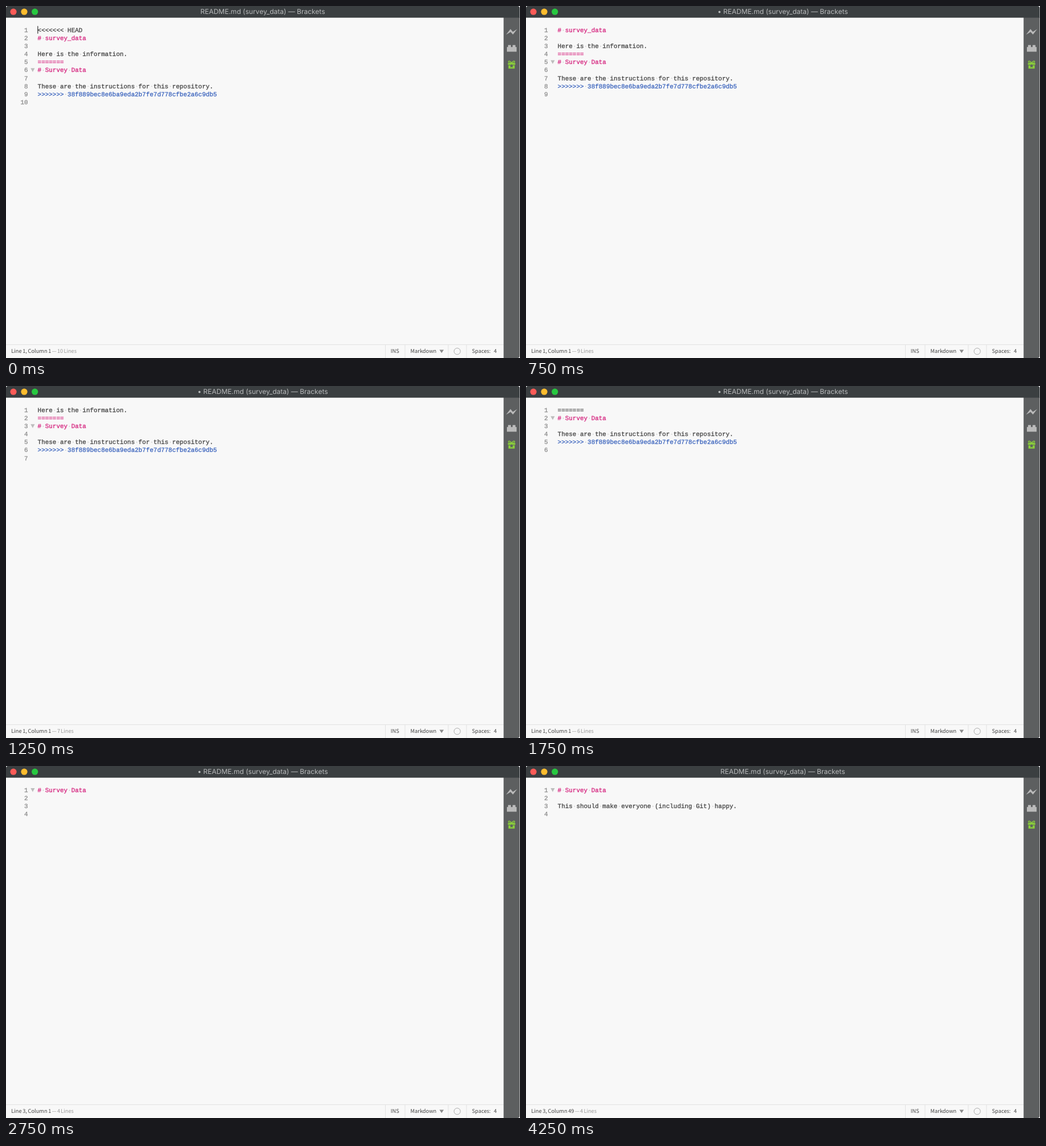
An HTML page that plays this animation: 903 by 620 pixels, repeating every 6750 ms.

```html
<!DOCTYPE html>
<html lang="en">
<head>
<meta charset="utf-8">
<title>Editor</title>
<style>
  html, body { margin: 0; width: 100%; height: 100%; overflow: hidden; background: #fff; }
  svg { display: block; width: 903px; height: 620px; }
  text { text-rendering: geometricPrecision; white-space: pre; }
  .title { font: 12px Inter, Roboto, sans-serif; fill: #b9bbbc; text-anchor: middle; }
  .code { font: 10.95px "Liberation Mono", "Noto Sans Mono", monospace;
          font-variant-ligatures: none; stroke-width: .3px; }
  .status { font: 9.25px "Noto Sans CJK JP", "Noto Sans CJK SC", "Noto Sans", sans-serif;
            fill: #454545; word-spacing: -.4px; }
  #count { font-weight: 300; fill: #999; word-spacing: -.9px; }
  .rule { stroke: #e2e2e2; fill: none; }
</style>
</head>
<body>
<svg viewBox="0 0 903 620" xmlns="http://www.w3.org/2000/svg">
  <defs>
    <clipPath id="window"><rect width="902.5" height="620" rx="4"/></clipPath>
  </defs>
  <g clip-path="url(#window)">
    <rect width="903" height="620" fill="#f8f8f8"/>
    <rect x="874.2" y="20" width="29" height="600" fill="#5d5f60"/>
    <rect width="903" height="20.6" fill="#3b3f41"/>
  </g>
  <circle cx="13" cy="10.2" r="5.6" fill="#fc5b57"/>
  <circle cx="32" cy="10.2" r="5.6" fill="#fdbc2e"/>
  <circle cx="50.7" cy="10.2" r="5.6" fill="#28c840"/>
  <text id="title" class="title" x="451" y="14.3"></text>

  <g fill="#bababa">
    <path d="M878.5 50.5 886.3 40.6 890.4 45.4 898 40.8 890.6 50.2 886.5 45.8Z"/>
    <path d="M880 72.3h2v-3.5h5v3.5h3v-3.5h5v3.5h2v8.2h-17z"/>
  </g>
  <g fill="#8bd13a">
    <path d="M888.2 100.4C881 100.4 882 96 884.8 97.2Q887 98.2 888.2 100.4Q889.4 98.2 891.6 97.2C894.4 96 895.4 100.4 888.2 100.4" fill="none" stroke="#8bd13a" stroke-width="1.3"/>
    <path d="M881.7 100.6h13v3h-13zM882.7 104.4h11v5.8h-11z"/>
    <path d="M888.2 102l1 2.2 2.300.3-1.700 1.600.5 2.300-2.100-1.100-2.100 1.100.5-2.300-1.700-1.600 2.300-.3z" fill="#5d5f60"/>
  </g>

  <g id="editor"></g>
  <rect id="caret" x="55.3" y="35.3" width="1.1" height="13.4" fill="#222"/>

  <path class="rule" d="M0 596.5H874M666.5 597V620M701 597V620M777 597V620M809 597V620"/>
  <text class="status" x="9.2" y="611.4"><tspan id="position"></tspan><tspan id="count"></tspan></text>
  <text class="status" x="675.8" y="611.4">INS</text>
  <text class="status" x="710.6" y="611.4">Markdown</text>
  <path d="M761.5 605.6h7.6l-3.8 5.6z" fill="#8a8a8a"/>
  <circle cx="792.7" cy="608.2" r="5.6" fill="none" stroke="#aaa"/>
  <text class="status" x="818.6" y="611.4">Spaces:</text>
  <text class="status" x="857" y="611.4">4</text>
</svg>
<script>
const STEP = 250, LOOP = 6750, LAST_STEP = 17;
const LEFT = 55.6, TOP = 45.9, ADVANCE = 6.57, LEADING = 14.1;
const DARK = '#454545', PINK = '#d5237e', BLUE = '#3a63bd';

const HEADING = '# Survey Data';
const HASH_LINE = '>>>>>>> 38f889bec8e6ba9eda2b7fe7d778cfbe2a6c9db5';
const CONFLICT = ['<<<<<<< HEAD', '# survey_data', '', 'Here is the information.', '=======',
  HEADING, '', 'These are the instructions for this repository.', HASH_LINE, ''];
const MESSAGE = 'This should make everyone (including Git) happy.';
const DELETED = [0, 0, 0, 1, 2, 3, 3, 4, 4, 5];   // lines removed from the top, per step
const TYPED = [0, 6, 13, 19, 26, 40, 48];         // characters typed, per step
const TYPING_START = 11;

const byId = id => document.getElementById(id);
const editor = byId('editor');

function add(name, attrs, content = '') {
  const node = document.createElementNS('http://www.w3.org/2000/svg', name);
  for (const key in attrs) node.setAttribute(key, attrs[key]);
  node.textContent = content;
  editor.appendChild(node);
}

const addCode = (x, y, content, color, anchor = 'start') =>
  add('text', { class: 'code', x, y, fill: color, stroke: color, 'text-anchor': anchor }, content);

function stateAt(step) {
  if (step < DELETED.length) {
    return { lines: CONFLICT.slice(DELETED[step]), row: 1, column: 1 };
  }
  if (step < TYPING_START) {
    return { lines: [HEADING, '', HASH_LINE, ''], row: 3, column: 1 };
  }
  const typed = TYPED[step - TYPING_START];
  return { lines: [HEADING, '', MESSAGE.slice(0, typed), ''], row: 3, column: typed + 1 };
}

function colorOf(line, previous) {
  if (line.startsWith('#')) return PINK;
  if (line.startsWith('>')) return BLUE;
  return line.startsWith('=') && previous ? PINK : DARK;
}

function drawLine(line, index, lines) {
  const y = TOP + index * LEADING;
  addCode(38.7, y, index + 1, '#8c8c8c', 'end');
  if (line === HEADING) add('path', { d: `M43.3 ${y - 6.8}h7.2l-3.6 6.6z`, fill: '#bdbdbd' });
  if (!line) return;
  addCode(LEFT, y, line, colorOf(line, lines[index - 1]));
  [...line].forEach((char, column) => {
    if (char !== ' ') return;
    const trailing = column === line.length - 1;
    add('circle', {
      cx: LEFT + (column + .5) * ADVANCE, cy: y - 3.2,
      r: trailing ? 1 : .75, fill: trailing ? '#d8304f' : '#b4b4b4'
    });
  });
}

function draw(step) {
  const { lines, row, column } = stateAt(step);
  const modified = step >= 3 && step < LAST_STEP;
  editor.replaceChildren();
  lines.forEach(drawLine);
  byId('title').textContent = (modified ? '• ' : '') + 'README.md (survey_data) — Brackets';
  byId('position').textContent = `Line ${row}, Column ${column}`;
  byId('count').textContent = ` — ${lines.length} Lines`;
  byId('caret').style.display = step === 0 ? '' : 'none';
}

let shown = -1;
const start = performance.now();
function tick() {
  const time = (performance.now() - start) % LOOP;
  const step = Math.min(Math.floor(time / STEP), LAST_STEP);
  if (step !== shown) draw(shown = step);
  requestAnimationFrame(tick);
}
tick();
</script>
</body>
</html>
```
